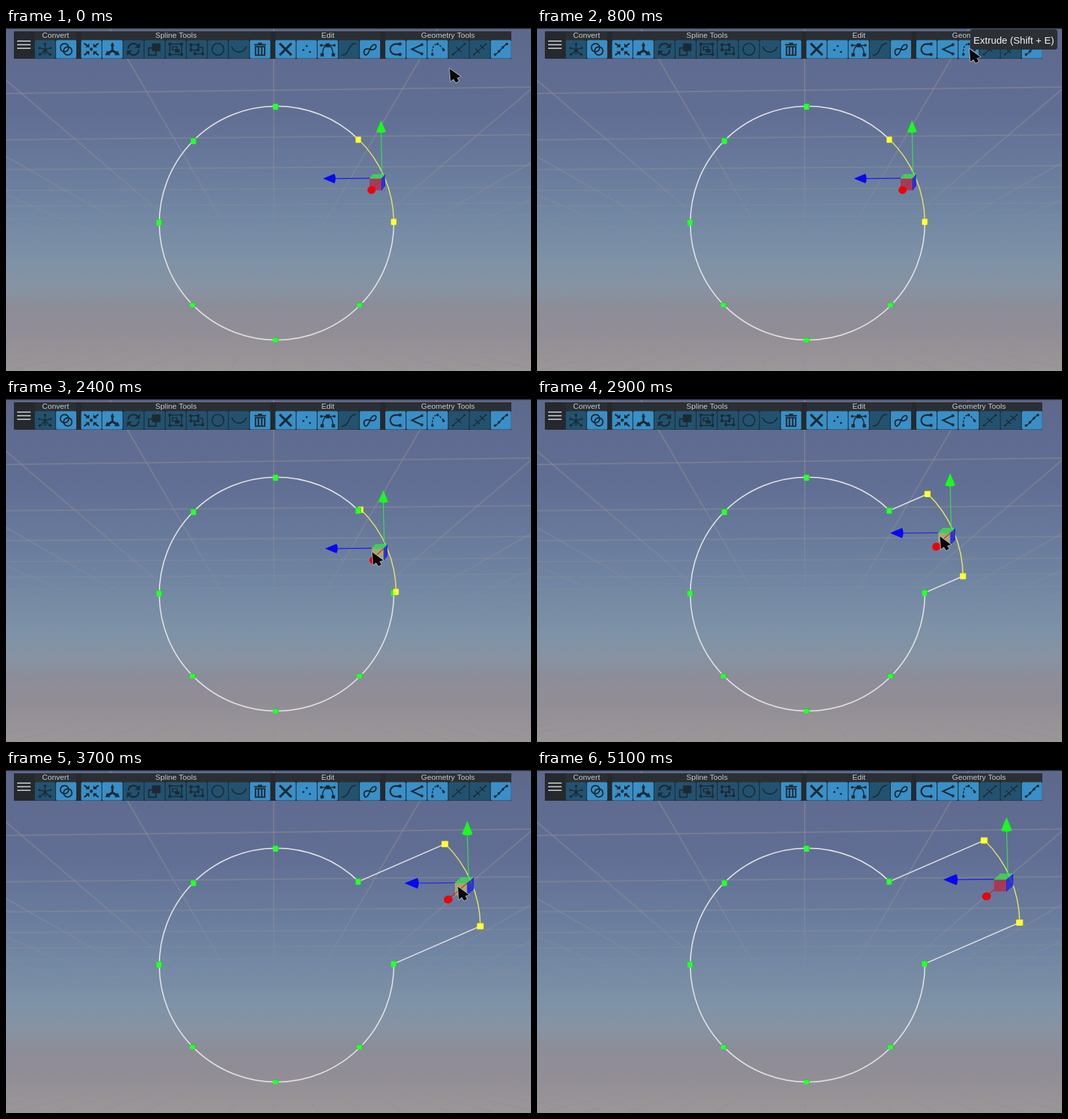
An HTML page with a canvas for the animation above (5200 ms loop, 800x524 px).

```html
<!DOCTYPE html>
<html lang="en">
<head>
<meta charset="utf-8">
<title>Spline extrude</title>
<style>
html, body { margin: 0; width: 100%; height: 100%; overflow: hidden; background: #65759a; }
canvas { display: block; }
</style>
</head>
<body>
<canvas id="stage" width="800" height="524"></canvas>
<script>
const ctx = document.getElementById('stage').getContext('2d');
const LOOP = 5200, STEP = 100, TAU = Math.PI * 2;
const CX = 412.3, CY = 298, R = 178.7;
const INK = '#1d2932';
const DRAG = [[2200, 0], [2400, .024], [3400, .782], [3900, 1]];
const POINTER = [
  [0, 676, 62], [200, 676, 62], [600, 660, 34], [800, 659, 32], [1150, 659, 32],
  [1600, 513, 231], [2100, 554, 238], [2400, 558, 234], [3400, 670, 186], [3900, 701, 173]
];

// Linear interpolation over rows of [time, ...values].
function track(rows, t) {
  if (t <= rows[0][0]) return rows[0].slice(1);
  for (let i = 1; i < rows.length; i++) {
    const a = rows[i - 1], b = rows[i];
    if (t <= b[0]) {
      const k = (t - a[0]) / (b[0] - a[0]);
      return a.slice(1).map((v, j) => v + (b[j + 1] - v) * k);
    }
  }
  return rows[rows.length - 1].slice(1);
}

function polygon(points, fill) {
  ctx.beginPath();
  points.forEach(([x, y]) => ctx.lineTo(x, y));
  ctx.closePath();
  ctx.fillStyle = fill;
  ctx.fill();
}

function line(a, b, color, width) {
  ctx.beginPath();
  ctx.moveTo(...a);
  ctx.lineTo(...b);
  ctx.strokeStyle = color;
  ctx.lineWidth = width;
  ctx.stroke();
}

function box(x, y, w, h, r, fill) {
  ctx.beginPath();
  ctx.roundRect(x, y, w, h, r);
  ctx.fillStyle = fill;
  ctx.fill();
}

function label(text, x, y, size, color, align) {
  ctx.font = `${size}px "Liberation Sans", Arial, sans-serif`;
  ctx.textAlign = align;
  ctx.fillStyle = color;
  ctx.fillText(text, x, y);
}

const dot = (x, y, r = 2) => `M${x - r} ${y}a${r} ${r} 0 1 0 ${2 * r} 0a${r} ${r} 0 1 0 ${-2 * r} 0z`;
const rect = (x, y, w, h) => `M${x} ${y}h${w}v${h}h${-w}z`;

function background() {
  const sky = ctx.createLinearGradient(0, 0, 0, 524);
  [[0, '#5d688b'], [.1, '#5f6b90'], [.25, '#616e94'], [.4, '#687a9b'], [.55, '#7287a3'],
   [.68, '#7e92a7'], [.75, '#8693a3'], [.81, '#8c8d99'], [.88, '#918d96'], [1, '#9b9697']]
    .forEach(([k, c]) => sky.addColorStop(k, c));
  ctx.fillStyle = sky;
  ctx.fillRect(0, 0, 800, 524);

  const horizon = 430, centre = 408;
  const fade = ctx.createLinearGradient(0, 40, 0, 342);
  fade.addColorStop(0, 'rgba(146,141,140,.52)');
  fade.addColorStop(.55, 'rgba(146,145,148,.42)');
  fade.addColorStop(1, 'rgba(146,148,155,0)');
  for (let i = 0; i < 8; i++) {
    const d = 1 / (.002985 + i * .000815);
    const y = x => horizon - d * (1 + (x - centre) / 800 * .029);
    line([0, y(0)], [800, y(800)], fade, 2);
  }
  for (let i = -6; i <= 6; i++) {
    const spread = i * 223 / 383;
    line([centre + spread * 430, 0], [centre + spread * 88, 342], fade, 2);
  }
  const floor = ctx.createLinearGradient(0, 480, 0, 524);
  floor.addColorStop(0, 'rgba(125,120,124,0)');
  floor.addColorStop(1, 'rgba(125,120,124,.25)');
  for (let i = -11; i <= 11; i++) {
    line([centre + i * 37, 480], [centre + i * 68, 524], floor, 1);
  }
  ctx.fillStyle = '#20252f';
  ctx.fillRect(0, 0, 800, 1.3);
}

// Icons: s = stroked outline, f = filled shape, w = line width, dash = dotted stroke.
const branch = { s: 'M0-7V0L-7 8M0 0L7 8M-9-2L0 0L9-2M-2 8L0 0L2 8', f: dot(0, -8) + dot(-8, 8) + dot(8, 8) + dot(-9, -2, 1.5) + dot(9, -2, 1.5), w: 1.3 };
const links = { s: dot(-2.5, -2.5, 6.3) + dot(2.5, 2.5, 6.3), w: 2 };
const gather = {
  s: 'M-11-9L-4-4M11-9L4-4M-11 9L-4 4M11 9L4 4', w: 2.2,
  f: dot(0, 0, 2.4) + 'M-3-3h-6l6-6zM3-3h6l-6-6zM-3 3h-6l6 6zM3 3h6l-6 6z'
};
const axes = { f: 'M0-11L3-5H1.5V1L7 4L8 2L11 9H3L4.5 7L0 4L-4.5 7L-3 9H-11L-8 2L-7 4L-1.5 1V-5H-3z' };
const cycle = { s: 'M-8-1A8 8 0 0 1 6-6M8 1A8 8 0 0 1-6 6', f: 'M10-10V-2H2zM-10 10V2H-2z', w: 2.4 };
const copy = { s: rect(-9, -2, 11, 11), f: rect(-4, -9, 13, 12), w: 2 };
const corners = (x, y, w, h) => [[x, y], [x + w, y], [x, y + h], [x + w, y + h]].map(([a, b]) => rect(a - 2, b - 2, 4, 4)).join('');
const group = { s: rect(-9, -8, 18, 16) + rect(-5, -4, 7, 5), f: corners(-9, -8, 18, 16) + rect(-1, 0, 7, 5), w: 1.6 };
const ungroup = { s: rect(-9, -7, 11, 8) + 'M2-3H9V7H-3V1', f: corners(-9, -7, 11, 8) + corners(-3, 7, 12, 0), w: 1.6 };
const ring = { s: dot(0, 0, 9), w: 1.7 };
const bowl = { s: 'M-11-4C-7 7 7 7 11-4', w: 1.8 };
const bin = { s: 'M-9-7H9M-3-9H3M-7-4V9H7V-4zM-2.5-3V8M2.5-3V8', w: 2.2 };
const cross = { s: 'M-9-9L9 9M9-9L-9 9', w: 3.4 };
const scatter = { f: dot(0, -5, 1.6) + dot(-5, 1, 1.6) + dot(5, 4, 1.6) };
const handles = { s: 'M-10-6H10M-8 8C-8-2-4-6 0-6S8-2 8 8', f: rect(-3, -9, 6, 6) + dot(-10, -6) + dot(10, -6) + rect(-11, 6, 5, 5) + rect(6, 6, 5, 5), w: 1.6 };
const sway = { s: 'M-11 9C3 9-3-9 11-9', w: 1.7 };
const knot = { s: 'M0 0C4-10 11-8 9-3S2 1 0 0S-10-2-9 5S-3 9 0 0', w: 2 };
const hook = { s: 'M6-8H0A8 8 0 0 0 0 8H6', f: dot(7, -8, 2.4) + dot(7, 8, 2.4), w: 2.4 };
const angle = { s: 'M8-7L-7 0L8 7', f: dot(8, -7, 2.2) + dot(8, 7, 2.2), w: 2.4 };
const extrude = { s: 'M-8 8C-9-2-6-8 0-8M3-6L9 0', f: dot(-8, 8) + dot(0, -8) + dot(9, 1), w: 1.7, dash: [3, 2] };
const split = { s: 'M-9 8L9-8M-4-3L4 4', f: dot(-9, 8, 1.5) + dot(9, -8, 1.5), w: 1.6 };
const divide = { s: 'M-9 8L9-8M-7-1L0 6M0-7L7 0', f: dot(-9, 8, 1.5) + dot(9, -8, 1.5), w: 1.6 };
const subdivide = { s: 'M-9 8C-4 7 4-7 9-8', f: dot(-9, 8) + dot(-3, 3) + dot(3, -3) + dot(9, -8), w: 1.6 };

const SECTIONS = [
  { name: 'Convert', x: 44, end: 107, mid: 75.5, icons: [branch, links], on: '01' },
  { name: 'Spline Tools', x: 114.5, end: 403.5, mid: 259, icons: [gather, axes, cycle, copy, group, ungroup, ring, bowl, bin], on: '110000001' },
  { name: 'Edit', x: 410.5, end: 571, mid: 490.5, icons: [cross, scatter, handles, sway, knot], on: '11101' },
  { name: 'Geometry Tools', x: 578, end: 770, mid: 673.5, icons: [hook, angle, extrude, split, divide, subdivide], on: '111001' }
];

function icon({ s, f, w = 1, dash = [] }, x, y) {
  ctx.save();
  ctx.translate(x, y);
  ctx.fillStyle = ctx.strokeStyle = INK;
  ctx.lineWidth = w;
  ctx.setLineDash(dash);
  if (s) ctx.stroke(new Path2D(s));
  if (f) ctx.fill(new Path2D(f));
  ctx.restore();
}

function toolbar() {
  box(12, 5, 758, 42, 1, '#25292d');
  for (const y of [20, 25.5, 31]) line([17, y], [37.5, y], '#d9dbdc', 1.6);
  for (const { name, x, end, mid, icons, on } of SECTIONS) {
    box(x, 5, end - x, 13, 0, '#2b2f33');
    label(name, mid, 15.2, 11.7, '#c9cbcc', 'center');
    icons.forEach((shape, i) => {
      const left = x + i * 32.15;
      box(left, 18.5, 31, 28, 2, on[i] === '1' ? '#398fc7' : '#225270');
      icon(shape, left + 15.5, 32.5);
    });
  }
}

const scenery = document.createElement('canvas');

function node(x, y, selected, grow = 0) {
  const w = 8.5 + grow, h = y > 400 ? 7.5 : 9.5;
  box(x - w / 2, y - h / 2, w, h, 1, selected ? '#e2d91f' : '#16cf20');
  box(x - w / 2, y - h / 2 + 1, w - 1, h - 1, 1, selected ? '#ffff36' : '#2bff34');
}

function spline(p, extruded) {
  const dx = 144.5 * p, dy = -63 * p;
  const from = Math.atan2(170.5 - CY, 537 - CX), to = Math.atan2(296 - CY, 591 - CX);
  ctx.lineWidth = 1.8;
  ctx.strokeStyle = '#dedfdf';
  ctx.beginPath();
  ctx.arc(CX, CY, R, to, from + TAU);
  ctx.stroke();
  if (p > 0) {
    line([537, 170.5], [537 + dx, 170.5 + dy], '#dedfdf', 1.7);
    line([591, 296], [591 + dx, 296 + dy], '#dedfdf', 1.7);
  }
  ctx.beginPath();
  ctx.arc(CX + dx, CY + dy, R, from, to);
  ctx.strokeStyle = '#e4df62';
  ctx.lineWidth = 1.7;
  ctx.stroke();

  [[411, 120], [286, 172.5], [233.5, 297], [284.5, 423], [411, 476.5], [539, 423]]
    .forEach(([x, y]) => node(x, y, false));
  node(537 + dx, 170.5 + dy, true, 2 * p);
  if (extruded) {
    node(537, 170.5, false);
    node(591, 296, false);
  }
  node(591 + dx, 296 + dy, true, 2 * p);
}

function gizmo(p, planeActive, arrowHover) {
  const at = (x0, y0, x1, y1) => [x0 + (x1 - x0) * p, y0 + (y1 - y0) * p];
  const [gx, gy] = at(571.5, 141, 715.5, 72);
  const [bx, by] = at(483, 230, 619, 167.5);
  const ball = at(557, 247.5, 685, 193);
  const origin = at(574, 228, 719, 162);
  const size = 1 + p * .15;

  line([gx, gy + 17], at(573, 224, 717.5, 160), '#2ee548', 1.3);
  line([bx + 17, by], at(555, 229.5, 698, 167), '#2222e0', 1.3);
  line(ball, origin, '#d01a2c', 1.3);

  const frontLeft = at(554, 229.5, 696.5, 167), frontRight = at(572.5, 229.5, 715.5, 167);
  const backLeft = at(558.5, 224, 705, 159), backRight = at(577, 224, 725, 159);
  const low = ([x, y], d) => [x, y + d];
  ctx.globalAlpha = .8;
  polygon([frontLeft, backLeft, backRight, frontRight], '#3fd957');
  polygon([frontRight, backRight, low(backRight, 18.5), low(frontRight, 18.5)], '#1c20e8');
  polygon([frontLeft, frontRight, low(frontRight, 18.5), low(frontLeft, 18.5)], planeActive ? '#b6b26b' : '#b52c4d');
  ctx.globalAlpha = 1;
  line(frontLeft, frontRight, '#2fdc45', 1.2);
  line(backLeft, backRight, '#2fe545', 1.2);
  line(frontRight, low(frontRight, 18.5), '#2a22d4', 1);
  line(backRight, low(backRight, 18), '#1919e4', 1.2);
  if (planeActive) line(low(frontLeft, 17), frontRight, '#cb3430', 1.2);

  ctx.beginPath();
  ctx.ellipse(...ball, 6.2 + p * .6, 6, -.3, 0, TAU);
  ctx.fillStyle = '#e80508';
  ctx.fill();

  const cone = (x, y, turn, fill) => {
    ctx.save();
    ctx.translate(x, y);
    ctx.rotate(turn);
    ctx.scale(size, size);
    ctx.beginPath();
    ctx.moveTo(0, 0);
    ctx.lineTo(7.3, 17.5);
    ctx.quadraticCurveTo(0, 21, -7.3, 17.5);
    ctx.fillStyle = fill;
    ctx.fill();
    ctx.restore();
  };
  cone(gx, gy, 0, '#18fb1d');
  cone(bx, by, -Math.PI / 2, arrowHover ? '#111c4c' : '#0808f2');
}

function tooltip() {
  box(660, 2, 133, 31, 4, '#2c3034');
  label('Extrude (Shift + E)', 665, 23.5, 15, '#f1f1f1', 'left');
}

function pointer(x, y) {
  ctx.save();
  ctx.translate(x, y);
  const arrow = new Path2D('M0 0L1.5 19.5L6 16L9.5 21.5L14 19L11.2 14L17 12.5z');
  ctx.lineJoin = 'round';
  ctx.lineWidth = 1.8;
  ctx.strokeStyle = '#b9bdc5';
  ctx.stroke(arrow);
  ctx.fillStyle = '#08090a';
  ctx.fill(arrow);
  ctx.restore();
}

function draw(t) {
  const [p] = track(DRAG, t);
  const dragging = t >= 2000 && t < 4100;
  ctx.drawImage(scenery, 0, 0);
  spline(p, t >= 1200);
  gizmo(p, dragging, t >= 1500 && t < 1800);
  if (t >= 700 && t < 1300) tooltip();
  if (t < 4100) pointer(...track(POINTER, t));
}

background();
toolbar();
scenery.width = 800;
scenery.height = 524;
scenery.getContext('2d').drawImage(ctx.canvas, 0, 0);

const start = performance.now();
function tick() {
  const t = (performance.now() - start) % LOOP;
  draw(Math.floor(t / STEP) * STEP);
  requestAnimationFrame(tick);
}
tick();
</script>
</body>
</html>
```
